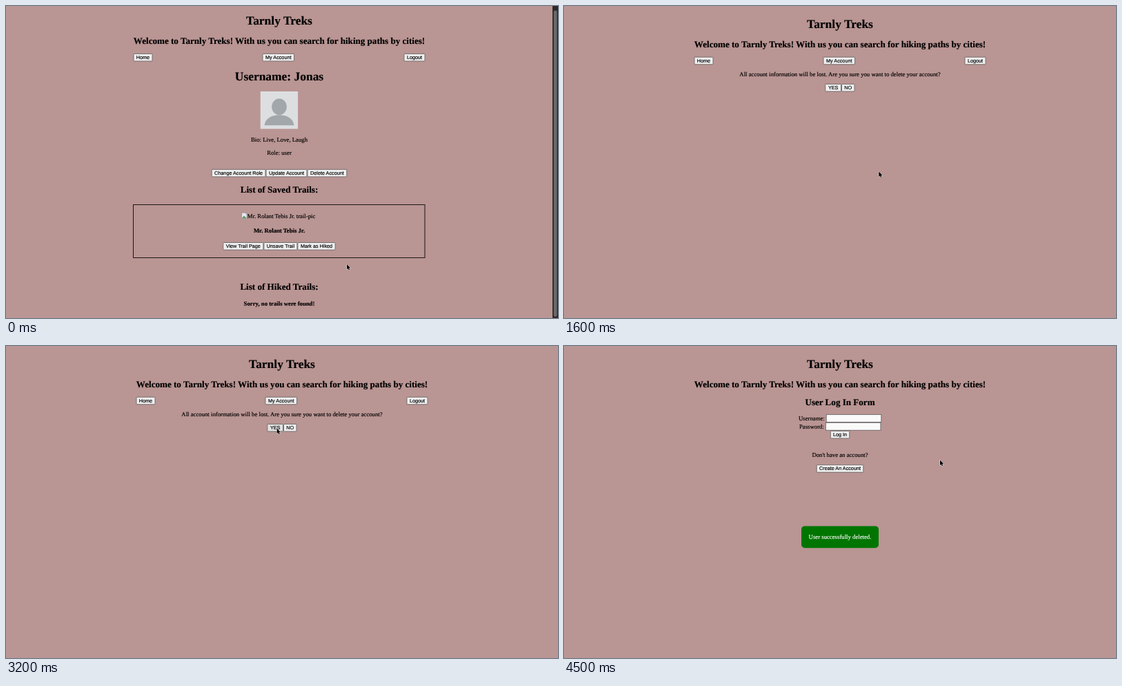
Animation of 800x453 px, one loop 4.6 s. Source, as an HTML page:

```html
<!DOCTYPE html>
<html lang="en">
<head>
<meta charset="utf-8">
<title>Tarnly Treks</title>
<style>
  html, body { margin: 0; width: 100%; height: 100%; overflow: hidden; background: #b99593; }
  svg { display: block; width: 800px; height: 453px; text-rendering: geometricPrecision; }
  text { font: 8.72px "Liberation Serif", "Times New Roman", serif; fill: currentColor; stroke: currentColor; stroke-width: .16; }
  .h1 { font-size: 17.44px; font-weight: bold; }
  .h2 { font-size: 13.08px; font-weight: bold; }
  .b { font-weight: bold; }
  .mid, .button text { text-anchor: middle; }
  .button text { font: 7.24px "Liberation Sans", Arial, sans-serif; }
  .button rect, .field { fill: #efefef; stroke: #6c6767; stroke-width: .9; }
  .button.hover rect { fill: #e1e1e1; }
  .field { fill: #fafafa; }
  .toast { color: #fff; }
</style>
</head>
<body>
<svg id="stage" viewBox="0 0 800 453"></svg>
<script>
const LOOP = 4600, STEP = 100;
const APP = 'Tarnly Treks', HIKER = 'Mr. Rolant Tebis Jr.';

const text = (x, y, s, cls = '') => `<text class="${cls}" x="${x}" y="${y}">${s}</text>`;
const mid = (x, y, s, cls = '') => text(x, y, s, 'mid ' + cls);
const field = (x, y) => `<rect class="field" x="${x}" y="${y}" width="79.6" height="11"/>`;

// A button spans left to right around the vertical centre y.
const button = (left, right, y, label) => `<g class="button" data-label="${label}">
  <rect x="${left + .5}" y="${y - 5.3}" width="${right - left - 1}" height="10.6" rx=".8"/>
  ${text((left + right) / 2, y + 2.4, label)}</g>`;

const header = (cx, dy) =>
  mid(cx, 31.6 + dy, APP, 'h1') +
  mid(cx, 59.5 + dy, `Welcome to ${APP}! With us you can search for hiking paths by cities!`, 'h2');

const nav = (cx, y) =>
  button(cx - 211.5, cx - 183.5, y, 'Home') +
  button(cx - 24.5, cx + 22, y, 'My Account') +
  button(cx + 180.5, cx + 211.5, y, 'Logout');

const avatar = `<rect x="368.7" y="124" width="54.4" height="54.4" fill="#dcdee0"/>
  <g fill="#a1a7aa"><ellipse cx="396" cy="146.4" rx="10.8" ry="11.8"/>
  <path d="M374.5 173.3C376 163 385 158.3 396 158.3S416 163 417.5 173.3Z"/></g>`;

const brokenImage = `<path d="M341.7 300.2h5l2.3 2.3v6h-7.3z" fill="#e4e9f2" stroke="#94908f" stroke-width=".7"/>
  <path d="M342.1 308.1l2.8-3.6 3.7 3.6z" fill="#5b9a55"/>`;

const scrollbar = `<rect x="792" width="8" height="453" fill="#2c2b2b"/>
  <rect x="793.8" y="6.5" width="4.7" height="444.5" rx="2.3" fill="#6b6a6a"/>`;

const account = header(396, -4.8) + nav(396, 74.7) +
  mid(396, 107.8, 'Username: Jonas', 'h1') + avatar +
  mid(396, 197.3, 'Bio: Live, Love, Laugh') +
  mid(396, 215.9, 'Role: user') +
  button(297.7, 376.5, 242.6, 'Change Account Role') +
  button(376.5, 436.5, 242.6, 'Update Account') +
  button(436.5, 494.3, 242.6, 'Delete Account') +
  mid(396, 271.3, 'List of Saved Trails:', 'h2') +
  '<rect x="184.5" y="288.5" width="422.5" height="77" fill="none" stroke="#1c1616"/>' +
  brokenImage + text(349.8, 307.5, HIKER + ' trail-pic') +
  mid(396, 329.3, HIKER, 'b') +
  button(314.3, 373.4, 348.8, 'View Trail Page') +
  button(373.4, 422.4, 348.8, 'Unsave Trail') +
  button(422.4, 477.6, 348.8, 'Mark as Hiked') +
  mid(396, 412.3, 'List of Hiked Trails:', 'h2') +
  mid(396, 435.2, 'Sorry, no trails were found!', 'b') + scrollbar;

const confirmation = header(400, 0) + nav(400, 79.5) +
  mid(400, 102.3, 'All account information will be lost. Are you sure you want to delete your account?') +
  button(378.3, 402, 118.7, 'YES') +
  button(402, 421.5, 118.7, 'NO');

const login = header(400, 0) +
  mid(400, 85.6, 'User Log In Form', 'h2') +
  text(340, 107.7, 'Username:') + field(380.2, 99.6) +
  text(341, 119.5, 'Password:') + field(379.3, 111.3) +
  button(385.8, 414.2, 128.7, 'Log In') +
  mid(400, 161.2, "Don't have an account?") +
  button(365.7, 434.3, 178, 'Create An Account') +
  '<rect x="344" y="261.4" width="112" height="31.8" rx="5" fill="#007500"/>' +
  mid(400, 280.3, 'User successfully deleted.', 'toast');

const pages = [[0, account], [1600, confirmation], [3300, login]];
const hovers = [['Delete Account', 700, 1600], ['NO', 2200, 2600], ['YES', 2600, 3300]];

// Pointer stops: time, x, y
const stops = [
  [0, 494, 375], [600, 458.7, 241.3], [800, 458.7, 241.3], [1100, 456.3, 240.3],
  [1800, 456.3, 240.3], [2200, 407.5, 122.2], [2400, 407.5, 122.2], [2800, 392.6, 119.6],
  [3200, 392.6, 119.6], [3600, 424, 113], [3700, 545, 165.7], [LOOP, 545, 165.7]
];

const stage = document.getElementById('stage');
stage.innerHTML = pages.map(([, body]) => `<g class="page">${body}</g>`).join('') +
  `<path id="pointer" d="M0 0V7.6L1.7 6.1 2.8 8.6 4.1 8 3 5.6H5.3Z"
    stroke="#fff" stroke-width=".9" paint-order="stroke"/>`;
const groups = [...stage.querySelectorAll('.page')];
const buttons = [...stage.querySelectorAll('.button')];
const pointer = document.getElementById('pointer');

function pointerAt(t) {
  const i = stops.findIndex(s => s[0] > t);
  const [t0, x0, y0] = stops[i - 1], [t1, x1, y1] = stops[i];
  const p = (t - t0) / (t1 - t0), k = p * p * (3 - 2 * p);
  return [x0 + (x1 - x0) * k, y0 + (y1 - y0) * k];
}

function draw(now) {
  const t = Math.floor(now % LOOP / STEP) * STEP;
  const page = pages.filter(([start]) => start <= t).length - 1;
  groups.forEach((g, i) => g.setAttribute('display', i === page ? 'inline' : 'none'));
  const hover = hovers.find(([, from, to]) => t >= from && t < to);
  buttons.forEach(b => b.classList.toggle('hover', !!hover && b.dataset.label === hover[0]));
  pointer.setAttribute('transform', `translate(${pointerAt(t)})`);
}

let begin;
function tick(now) {
  begin ??= now;
  draw(now - begin);
  requestAnimationFrame(tick);
}
draw(0);
requestAnimationFrame(tick);
</script>
</body>
</html>
```
